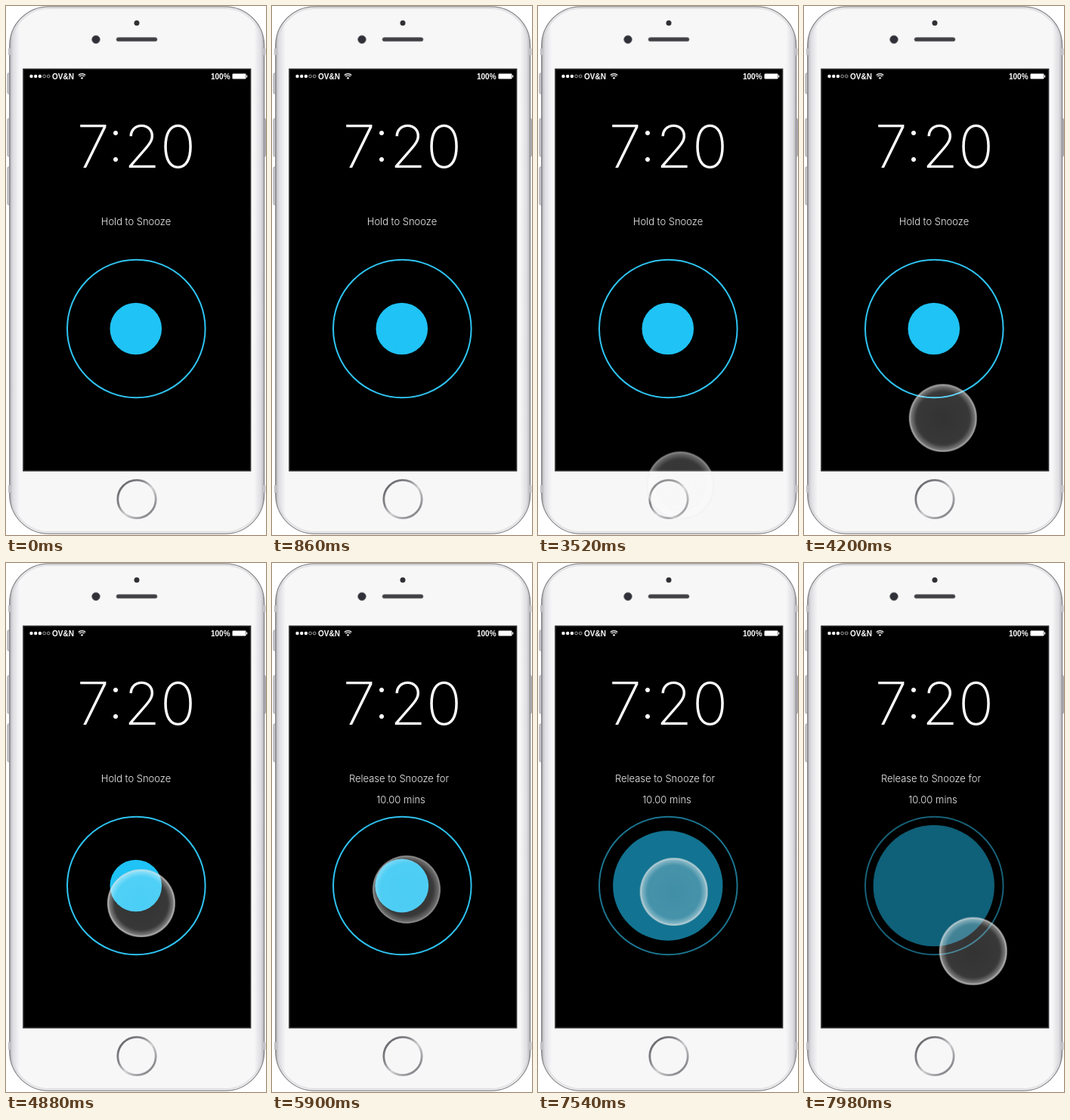
Animation of 344x700 px, one loop 8 s. Source, as an HTML page:

```html
<!DOCTYPE html>
<html lang="en">
<head>
<meta charset="utf-8">
<title>Snooze control</title>
<style>
html, body { margin: 0; width: 100%; height: 100%; overflow: hidden; background: #fff; }
svg { display: block; width: 344px; height: 700px; }
text { font-family: Inter, Roboto, sans-serif; fill: #fff; }
.time { font-size: 78px; font-weight: 200; text-anchor: middle; }
.label { font-size: 13px; font-weight: 300; text-anchor: middle; fill: #f0f0f0; }
.status { font: bold 10px "Liberation Sans", Arial, sans-serif; }

.control, .disc, .cursor, .touch, .rim, .idle, .held { animation: 8s linear infinite; }

.control { animation-name: fade; }
@keyframes fade {
  0%, 73.25% { opacity: 1; }
  100% { opacity: .49; }
}

.disc { animation-name: grow; }
@keyframes grow {
  0%, 73.25% { r: 34.3px; animation-timing-function: cubic-bezier(.333, .422, .667, .755); }
  100% { r: 80.5px; }
}

.cursor { animation-name: cursor, cursor-show; }
@keyframes cursor {
  0%, 21% { transform: translate(198px, 718px); }
  24.25% { transform: translate(196px, 687px); }
  28.75%, 100% { transform: translate(194px, 676px); }
}
@keyframes cursor-show {
  0%, 28.74% { opacity: 1; }
  28.75%, 100% { opacity: 0; }
}

.touch { animation-name: drag, touch-show; animation-timing-function: cubic-bezier(.333, 0, .667, 1), step-end; }
@keyframes drag {
  0%, 28.75% { transform: translate(193px, 672px); }
  40.5% { transform: translate(189px, 646px); }
  65.5%, 93.5% { transform: translate(178px, 432px); }
  100% { transform: translate(224px, 514px); }
}
@keyframes touch-show {
  0% { opacity: 0; }
  28.75%, 100% { opacity: 1; }
}

.rim { animation-name: rim; }
@keyframes rim {
  0%, 44% { opacity: .5; }
  56%, 71.5% { opacity: 1; }
  73.25%, 75% { opacity: .5; }
  80%, 100% { opacity: 1; }
}

.idle { animation-name: idle; animation-timing-function: step-end; }
.held { animation-name: held; animation-timing-function: step-end; }
@keyframes idle { 0% { opacity: 1; } 73.25%, 100% { opacity: 0; } }
@keyframes held { 0% { opacity: 0; } 73.25%, 100% { opacity: 1; } }
</style>
</head>
<body>
<svg viewBox="0 0 344 700">
  <defs>
    <linearGradient id="edge">
      <stop offset="0" stop-color="#909094"/>
      <stop offset=".012" stop-color="#dcdce0"/>
      <stop offset=".04" stop-color="#f7f7f8"/>
      <stop offset=".96" stop-color="#f7f7f8"/>
      <stop offset=".988" stop-color="#dcdce0"/>
      <stop offset="1" stop-color="#909094"/>
    </linearGradient>
    <linearGradient id="metal" x1="0" y1="0" x2="1" y2="1">
      <stop offset="0" stop-color="#5c5c60"/>
      <stop offset=".35" stop-color="#88888c"/>
      <stop offset=".55" stop-color="#d2d2d4"/>
      <stop offset=".75" stop-color="#a0a0a4"/>
      <stop offset="1" stop-color="#6c6c70"/>
    </linearGradient>
    <radialGradient id="glass">
      <stop offset="0" stop-color="#fff" stop-opacity=".2"/>
      <stop offset=".76" stop-color="#fff" stop-opacity=".22"/>
      <stop offset="1" stop-color="#fff" stop-opacity=".38"/>
    </radialGradient>
    <radialGradient id="glow">
      <stop offset=".8" stop-color="#fff" stop-opacity="0"/>
      <stop offset=".93" stop-color="#f4f4f4" stop-opacity=".22"/>
      <stop offset=".975" stop-color="#e6e6e6" stop-opacity=".65"/>
      <stop offset="1" stop-color="#ccc" stop-opacity=".35"/>
    </radialGradient>
  </defs>

  <g fill="#d0d0d4" stroke="#8c8c92" stroke-width=".8">
    <rect x="2" y="89" width="5" height="27" rx="1.5"/>
    <rect x="2" y="149" width="5" height="50" rx="1.5"/>
    <rect x="2" y="213" width="5" height="50" rx="1.5"/>
    <rect x="339" y="149" width="4.5" height="50" rx="1.5"/>
  </g>
  <rect x="4.7" y=".8" width="337" height="697.5" rx="52" fill="url(#edge)" stroke="#88888c" stroke-width="1.2"/>
  <rect x="7" y="3" width="332.5" height="693" rx="50" fill="none" stroke="#d4d4d8" stroke-width="2" opacity=".6"/>
  <path d="M5 56v9M341.5 56v9M5 634v10M341.5 634v10" stroke="#c2c2c6" stroke-width="4"/>

  <circle cx="173" cy="22.5" r="3.5" fill="#303034"/>
  <circle cx="119" cy="44.3" r="5.3" fill="#303038" stroke="#68686c" stroke-width=".8"/>
  <rect x="146" y="41.7" width="54" height="5" rx="2.5" fill="#404044" stroke="#747478" stroke-width=".8"/>
  <circle cx="173" cy="652.5" r="25.2" fill="#f7f7f8" stroke="url(#metal)" stroke-width="2.8"/>

  <rect x="23" y="83.5" width="300.5" height="531.5" fill="#000" stroke="#2c2c2e" stroke-width="1.6"/>

  <g fill="#fff">
    <circle cx="33.5" cy="93" r="2.2"/>
    <circle cx="39.2" cy="93" r="2.2"/>
    <circle cx="44.9" cy="93" r="2.2"/>
    <g fill="none" stroke="#d8d8d8" stroke-width=".7">
      <circle cx="50.6" cy="93" r="1.9"/>
      <circle cx="56.2" cy="93" r="1.9"/>
    </g>
    <path d="M100.500 97l-1.800-2a2.700 2.700 0 0 1 3.600 0z"/>
    <path d="M97.300 93.300a4.700 4.700 0 0 1 6.400 0M95.800 91.500a7 7 0 0 1 9.400 0" fill="none" stroke="#fff" stroke-width="1.2"/>
    <rect x="299.500" y="89.500" width="18" height="7" rx="1.2"/>
    <path d="M318 91.500h1.200v3H318z"/>
  </g>
  <text class="status" x="61" y="96.700">OV&amp;N</text>
  <text class="status" x="271" y="96.700">100%</text>

  <text class="time" x="172.5" y="214">7:20</text>
  <text class="label idle" x="172" y="290">Hold to Snooze</text>
  <g class="held">
    <text class="label" x="168" y="290">Release to Snooze for</text>
    <text class="label" x="170.5" y="318">10.00 mins</text>
  </g>

  <g class="control">
    <circle cx="172.3" cy="427" r="91.3" fill="none" stroke="#2fc4f2" stroke-width="2"/>
    <circle class="disc" cx="171.8" cy="427" r="34.3" fill="#1fc3f5"/>
  </g>

  <g class="touch">
    <circle r="45" fill="url(#glass)"/>
    <circle class="rim" r="45" fill="url(#glow)"/>
  </g>
  <path class="cursor" d="M0-13.500L7-5.500H2.500V5.500H7L0 13.500L-7 5.500H-2.500V-5.500H-7Z" fill="#000" stroke="#fff" stroke-width="1.3"/>
</svg>
</body>
</html>
```
